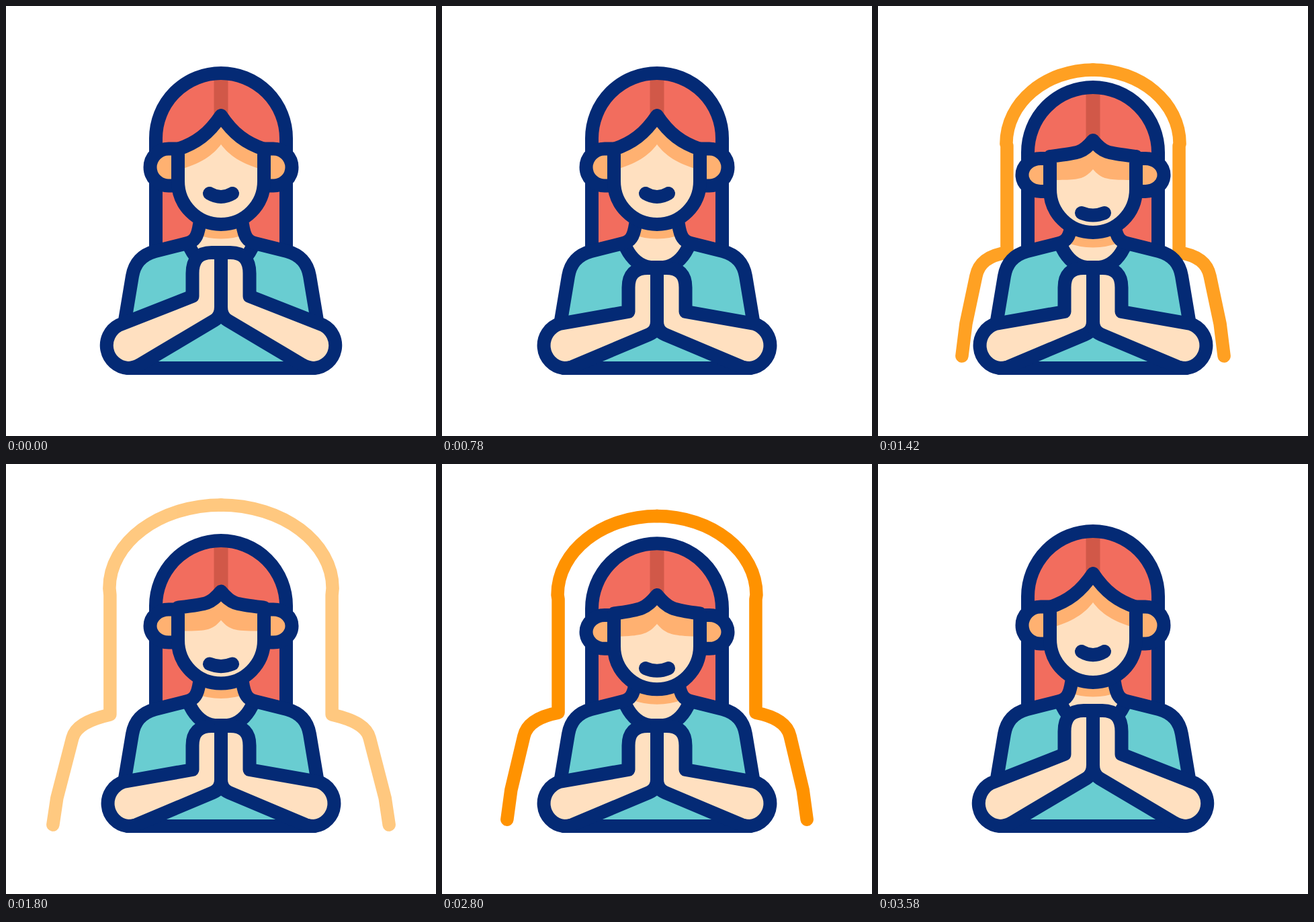
Recreate the animation shown at these times as an HTML page. Size 640 by 640 pixels, loop 3600 ms.

```html
<!DOCTYPE html>
<html lang="en">
<head>
<meta charset="utf-8">
<title>Prayer</title>
<style>
  html, body { margin: 0; width: 100%; height: 100%; overflow: hidden; background: #fff; }
  svg { display: block; width: 100vw; height: 100vh; }
  .line { fill: none; stroke: #042a75; stroke-width: 20; stroke-linecap: round; stroke-linejoin: round; }
  .hair { fill: #f26d5e; }
  .skin { fill: #ffe0c0; }
  .shade { fill: #ffb171; }
  .teal { fill: #69cdd1; }
  #hair { stroke-linecap: butt; }
  #wave { fill: none; stroke: #ff9200; stroke-width: 19.5; stroke-linecap: round; stroke-linejoin: round; }
</style>
</head>
<body>
<svg viewBox="0 0 640 640">
  <defs>
    <clipPath id="neckClip">
      <path d="M288 310H352C354 345 360 350 370 355Q346 389 320 389Q294 389 270 355C280 350 286 345 288 310Z"/>
    </clipPath>
  </defs>

  <g id="wave" opacity="0">
    <path id="aura"/>
    <use href="#aura" transform="matrix(-1 0 0 1 640 0)"/>
  </g>

  <path id="hairFill" class="hair"/>
  <path id="parting" stroke="#d15848" stroke-width="21"/>
  <path id="hair" class="line"/>

  <path class="teal" d="M270 353L222 365C200 371 191 385 188 402L170 539H470L452 402C449 385 440 371 418 365L370 353Z"/>
  <g clip-path="url(#neckClip)">
    <path class="skin" d="M260 300H380V400H260Z"/>
    <path id="neckShade" class="shade"/>
  </g>
  <path class="line" d="M274 360Q287 386 310 389H330Q353 386 366 360"/>
  <g id="shoulder">
    <path class="line" d="M288 325C285 345 280 350 270 353L222 365C200 371 191 385 188 402L177 468"/>
  </g>
  <use href="#shoulder" transform="matrix(-1 0 0 1 640 0)"/>
  <path class="line" d="M181 539H459"/>
  <path id="arm" class="line skin"/>
  <use href="#arm" transform="matrix(-1 0 0 1 640 0)"/>

  <g id="head">
    <path id="ear" class="line shade"/>
    <use href="#ear" transform="matrix(-1 0 0 1 640 0)"/>
    <path id="brow" class="shade"/>
    <path id="face" class="skin"/>
    <path id="outline" class="line"/>
    <path id="mouth" class="line"/>
  </g>
</svg>
<script>
const LOOP = 3600;
const $ = id => document.getElementById(id);

// Pairs of poses: rest and end
const poses = {
  aura: [
    'M125 521L131 473L146 402C150 383 164 371 192 367L192 208L191 205C191 144 249 95 321 95',
    'M70 537L76 497L99 408C103 392 120 381 155 373L155 195L154 185C154 117 228 61 321 61'],
  arm: [
    'M320 367H306Q277.5 367 277.5 398V432L168 475A34 34 0 0 0 181 539Q190 539 199 534L310 468Q320 462 320 448Z',
    'M320 390H306Q277.5 390 277.5 419V455L175 473A34 34 0 0 0 181 539Q187 539 194 537L308 489Q320 484 320 470Z'],
  ear: [
    'M256 212.5H242A27.5 27.5 0 0 0 242 267.5H256',
    'M256 227H242A27.5 24.5 0 0 0 242 276H256'],
  outline: [
    'M256 213C283 204 302 190 320 163C338 190 357 204 384 213V261A64 64 0 0 1 256 261Z',
    'M256 224C300 219 304 219 320 200C336 219 340 219 384 224V273A64 64 0 0 1 256 273Z'],
  face: [
    'M256 244C290 235 308 222 320 206C332 222 350 235 384 244V261A64 64 0 0 1 256 261Z',
    'M256 259C298 259 306 259 320 243C334 259 342 259 384 259V273A64 64 0 0 1 256 273Z'],
  mouth: ['M303 279Q320 289 337 279', 'M303 308Q320 315 337 308'],
  neckShade: [
    'M280 300V339Q320 354 360 339V300Z',
    'M280 313V352Q320 367 360 352V313Z']
};

const clamp = x => Math.min(1, Math.max(0, x));
const ease = (t, a, b) => { const x = clamp((t - a) / (b - a)); return x * x * (3 - 2 * x); };

// Arc flags must stay bare 0 or 1, so trailing zeros are dropped
function mix([a, b], k) {
  const ends = b.match(/[\d.]+/g);
  let i = 0;
  return a.replace(/[\d.]+/g, n => +(+n + (ends[i++] - n) * k).toFixed(2));
}

const shape = (id, k) => $(id).setAttribute('d', mix(poses[id], k));

function draw(t) {
  shape('arm', ease(t, 0, 800) - ease(t, 2800, 3600));

  // The head bows, then nods half way up and down before rising
  const squash = ease(t, 800, 1400) - ease(t, 2560, 3600);
  const nod = (ease(t, 2000, 2560) - ease(t, 1400, 2000)) / 2;
  const drop = nod * 28;
  ['ear', 'outline', 'face', 'mouth', 'neckShade'].forEach(id => shape(id, squash));
  $('brow').setAttribute('d', mix(poses.outline, squash));
  $('head').setAttribute('transform', `translate(0 ${drop})`);
  $('neckShade').setAttribute('transform', `translate(0 ${drop})`);

  const y = 197 + 21 * squash + nod * 18.7;
  const dome = `M223 362V${y}A97 97 0 0 1 417 ${y}V362`;
  $('hair').setAttribute('d', dome);
  $('hairFill').setAttribute('d', dome);
  $('parting').setAttribute('d', `M320 ${y - 97}V${163 + 37 * squash + drop}`);

  // Two glowing waves, one every 1200 ms
  const w = t < 1100 || t > 3400 ? 0 : (t - 1100) % 1200;
  shape('aura', (ease(w, 0, 880) - 0.301) / 0.59);
  $('wave').setAttribute('opacity', ease(w, 60, 400) - ease(w, 500, 900));
}

function tick() {
  draw(performance.now() % LOOP);
  requestAnimationFrame(tick);
}
tick();
</script>
</body>
</html>
```
